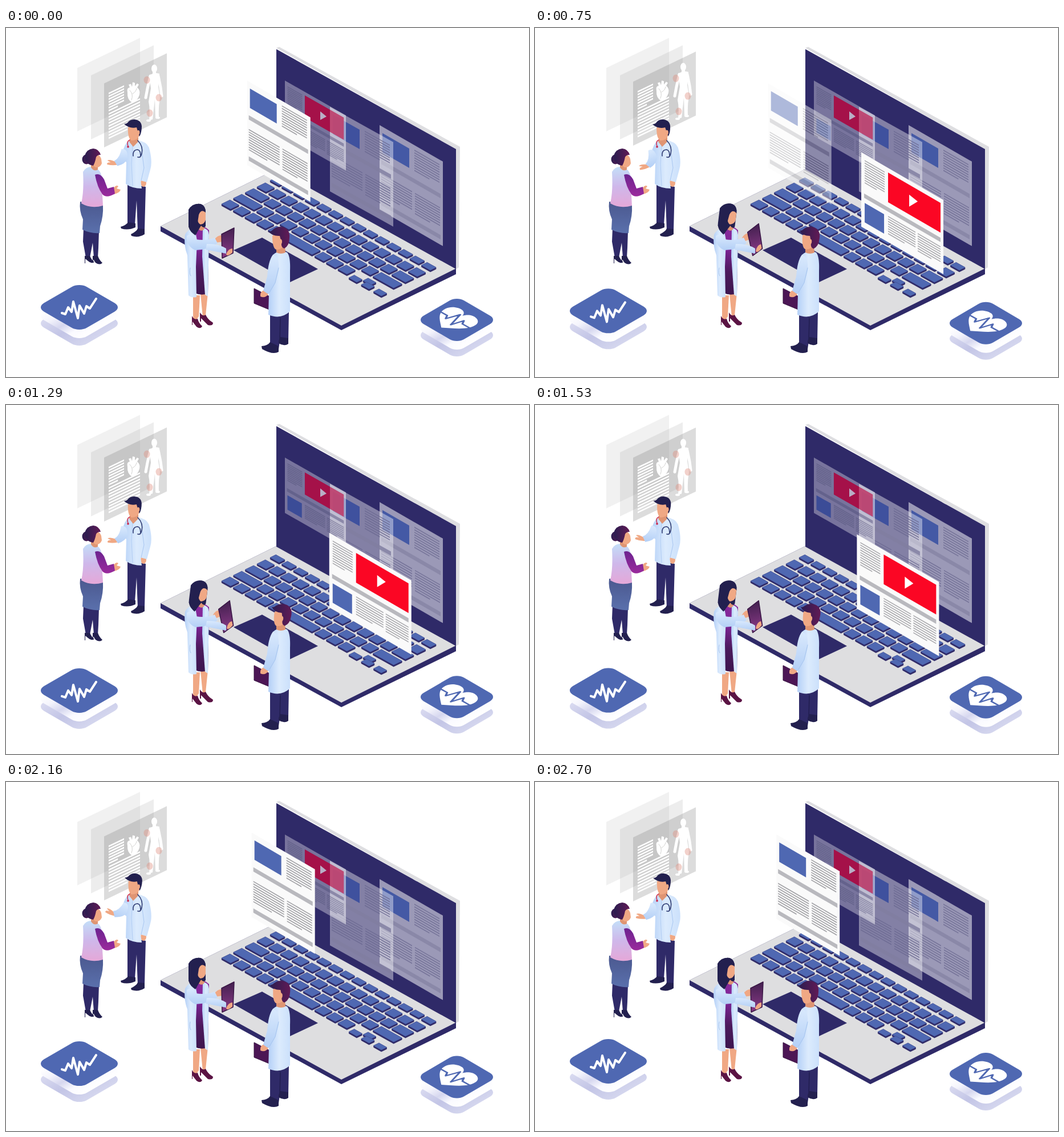
An HTML page for the animation above (2730 ms loop, 917 px wide and 611 px high).

```html
<!DOCTYPE html>
<html lang="en">
<head>
<meta charset="utf-8">
<title>Online medicine</title>
<style>
html, body { margin: 0; width: 100%; height: 100%; overflow: hidden; background: #fff; }
svg { display: block; width: 917px; height: 611px; }
</style>
</head>
<body>
<svg id="stage" viewBox="0 0 917 611" xmlns="http://www.w3.org/2000/svg"></svg>
<script>
const LOOP = 2730, STEP = 30;
const NAVY = '#2f2a68', BLUE = '#4f68b2', SKIN = '#f0a884', DARK = '#23204f';

const poly = (pts, fill, extra = '') => `<polygon points="${pts}" fill="${fill}" ${extra}/>`;
const path = (d, fill, extra = '') => `<path d="${d}" fill="${fill}" ${extra}/>`;
const line = (d, color, w) =>
  path(d, 'none', `stroke="${color}" stroke-width="${w}" stroke-linecap="round" stroke-linejoin="round"`);
const rect = (x, y, w, h, fill, extra = '') =>
  `<rect x="${x}" y="${y}" width="${w}" height="${h}" fill="${fill}" ${extra}/>`;
const oval = (x, y, rx, ry, fill, extra = '') =>
  `<ellipse cx="${x}" cy="${y}" rx="${rx}" ry="${ry}" fill="${fill}" ${extra}/>`;
const group = (body, attrs = '') => `<g ${attrs}>${body}</g>`;
const skew = (x, y, k) => `transform="matrix(1 ${k} 0 1 ${x} ${y})"`;
const grad = (id, dir, ...colors) => `<linearGradient id="${id}" ${dir}>` + colors.map((c, i) =>
  `<stop offset="${i / (colors.length - 1)}" stop-color="${c}"/>`).join('') + '</linearGradient>';
const DOWN = 'x2="0" y2="1"', ACROSS = 'x2="1" y2="0"';

const defs = '<defs>' +
  grad('coat', ACROSS, '#b4d0f7', '#dcebfd', '#cbe0fb') +
  grad('sleeve', DOWN, '#d9e9fd', '#b3cff6') +
  grad('knit', DOWN, '#c3def8', '#cfb7ea', '#e5a8d8') +
  grad('violet', DOWN, '#6d2390', '#9a2a9c') +
  grad('dress', DOWN, '#8a2a9e', '#7c2394', '#4b1a5c', '#3d164f') +
  grad('skirt', DOWN, '#4b588f', '#5a70ac') +
  grad('hair', ACROSS, '#2a1d50', '#611a55') +
  grad('tablet', DOWN, '#43204f', '#8b3a88') +
  grad('side', ACROSS, '#ffffff', '#f4f4fc', '#d6d7ef', '#fafaff', '#ffffff') +
  grad('shade', ACROSS, '#d9daf0', '#c3c5e6', '#d4d6ee') +
  '</defs>';

// Rows of text; the last row is shorter.
function rows(x, y, w, n, step, h, fill) {
  let s = '';
  for (let i = 0; i < n; i++) s += rect(x, y + i * step, i == n - 1 ? w * .6 : w, h, fill);
  return s;
}

function article(paper, ink, bar, blue) {
  return rect(0, 0, 111, 148, paper) + rect(5, 11, 47, 34, blue) +
    rows(61, 8, 44, 9, 4.4, 1.9, ink) + rect(3, 59, 104, 7.5, bar) +
    rows(3, 83, 54, 9, 4.4, 1.9, ink) + rows(62, 83, 44, 9, 4.4, 1.9, ink) +
    rect(3, 131, 104, 7.5, bar);
}

function video(w, h, paper, ink, bar, blue, red) {
  const a = w / 144, b = h / 130;
  return rect(0, 0, w, h, paper) + rows(6 * a, 10 * b, 35 * a, 10, 4.3 * b, 1.8, ink) +
    rect(47 * a, 8 * b, 92 * a, 52 * b, red) + rect(5 * a, 69 * b, 134 * a, 7.5 * b, bar) +
    rect(6 * a, 85 * b, 34 * a, 34 * b, blue) +
    rows(47 * a, 84 * b, 48 * a, 8, 4.3 * b, 1.8, ink) + rows(99 * a, 84 * b, 40 * a, 8, 4.3 * b, 1.8, ink);
}

function key(u, v, w = 1, du = .76, dv = .7) {
  const at = (p, q) => [476 + p * 20.4 - q * 20.7, 269 + p * 11.4 + q * 10];
  const a = (w - 1 + du) / 2, b = dv / 2;
  const corners = [[-a, -b], [a, -b], [a, b], [-a, b]].map(([p, q]) => at(u + p, v + q));
  const [top, right, low, left] = corners;
  const drop = ([x, y]) => [x, y + 3];
  const pts = list => list.map(c => c.map(n => n.toFixed(1)).join()).join(' ');
  return poly(pts([left, top, right, drop(right), drop(low), drop(left)]), NAVY,
      `stroke="${NAVY}" stroke-width=".8" stroke-linejoin="round"`) +
    poly(pts(corners), BLUE, `stroke="${BLUE}" stroke-width=".6" stroke-linejoin="round"`);
}

function keyboard() {
  const layout = [
    Array(14).fill(1),
    Array(14).fill(1),
    [1.6, ...Array(11).fill(1), 1.4],
    [2, ...Array(10).fill(1), 2],
    [1, 1, 1, 1, 4, 1, 1, 1]
  ];
  let s = '';
  layout.forEach((row, v) => {
    let u = -.5;
    for (const w of row) {
      s += key(u + w / 2, v, w, .76, v ? .7 : .48);
      u += w;
    }
  });
  s += key(11.9, 3.93, 1, .66, .42);
  for (let i = 0; i < 3; i++) s += key(11.1 + i * 1.06, 4.33, 1, .66, .45);
  return s;
}

function laptop() {
  const ink = '#77759a', bar = '#8a88a8';
  return poly('271,347 474,247 789,421 789,431 588,529 271,356', NAVY) +
    poly('271,347 474,247 789,421 588,521', '#dedee0') +
    poly('474,35 479,33 796,208 794,419 789,422 789,212', '#dedee1') +
    poly('474,37 789,212 789,422 474,248', NAVY) +
    keyboard() + poly('399,389 449,367 547,422 498,445', NAVY) +
    group(article('rgba(255,255,255,.52)', ink, bar, '#4459a5'), skew(655, 170, .575)) +
    group(article('rgba(255,255,255,.45)', ink, bar, '#4156a4'), 'opacity=".9" ' + skew(568, 138, .556)) +
    group(video(107, 97, 'rgba(255,255,255,.38)', '#6a688f', '#696790', '#3d4f9c', '#b00f47'),
      'opacity=".92" ' + skew(489, 92, .57)) +
    poly('568,138 596,153 596,248 568,232', 'rgba(255,255,255,.22)') +
    poly('551,146 551,161 562,155', '#b9aec6');
}

function poster() {
  const sheet = (x, y, h, a) => group(rect(0, 0, 110, h, `rgba(125,125,126,${a})`), skew(x, y, -.48));
  const body = line('M260 82V108M253 84L248 106L245 122M267 84L271 104L273 119', '#fff', 5) +
    path('M251 83Q260 77 269 80L267 103L270 122Q267 139 268 155L262 157L261 125L257 160L251 162Q253 142 250 129L254 106Z', '#fff') +
    oval(260, 71, 5, 7, '#fff') + rect(257, 75, 6, 7, '#fff') +
    oval(250, 162, 4, 2, '#fff') + oval(266, 157, 4, 2, '#fff');
  const heart = path('M213 113Q211 105 217 104L215 99L219 98L221 103L222 95L226 96L226 102L230 97L233 99L230 104Q236 109 234 117Q231 127 222 131Q212 126 213 113Z', '#fff') +
    line('M217 109Q224 116 220 126M222 115Q228 112 229 106', '#d2d2d0', 1);
  const spot = (x, y) => oval(x, y, 5.5, 6.5, 'rgba(222,140,125,.4)');
  return sheet(125, 70, 111, .11) + sheet(149, 83, 112, .14) +
    group(sheet(172, 97, 112, .27) +
      group(rows(8, 20, 27, 7, 5, 2.8, '#fff') + rows(8, 56, 55, 9, 5.3, 2.8, '#fff'), skew(172, 97, -.48)) +
      heart + body + spot(247, 91) + spot(268, 122) + spot(252, 149), 'id="sheet"');
}

function leftDoctor() {
  return path('M213 272L245 278L243 353L231 356L229 302L226 344L213 343Z', NAVY) +
    path('M201 348Q211 345 214 340L227 342V349Q214 355 202 351Z', DARK) +
    path('M219 361Q229 356 231 351L243 352V361Q232 368 220 364Z', DARK) +
    oval(241, 271, 5, 7, SKIN) +
    path('M212 200Q220 194 237 198Q250 202 252 214Q257 235 253 248L247 270L236 267L238 281Q221 281 210 273L211 235L203 228Q204 211 212 200Z', 'url(#coat)') +
    line('M239 222L242 245L237 267', '#a9c7f1', 1) + line('M222 204L220 238L222 276', '#b2cdf3', 1) +
    group(path('M208 231L196 240Q187 242 178 240Q176 236 184 236L178 233Q182 230 193 235L204 223Z', SKIN) +
      path('M202 212Q214 210 213 228Q210 238 196 242L190 233Q199 229 202 212Z', 'url(#sleeve)'), 'id="arm"') +
    path('M218 189H232V199L223 208L216 199Z', '#df9573') +
    line('M217 196Q211 198 214 207', '#d0304e', 1.5) + oval(214, 208, 1.8, 1.8, '#c92145') +
    line('M231 197Q241 207 238 220Q236 228 231 226M223 224Q222 213 231 213Q236 214 236 224', '#344177', 1.7) +
    group(path('M214 174Q223 167 235 173L234 188Q230 197 220 197Q213 193 214 174Z', SKIN) +
      path('M207 168Q211 168 213 166Q217 160 225 160Q237 161 238 172Q238 183 234 190L231 181L229 174Q217 177 207 168Z', DARK) +
      oval(232, 183, 2.4, 4, SKIN), 'id="head1"');
}

function leftWoman() {
  return path('M136 350L163 355L162 385L161 402L154 402L152 376L147 402L140 402L135 374Z', NAVY) +
    path('M138 399L147 399Q150 406 155 410Q149 413 144 408L139 404L139 412H138Z', DARK) +
    path('M152 399L161 399Q164 407 169 411Q165 416 157 411L153 405L153 410H152Z', DARK) +
    path('M130 304L170 310Q171 330 165 347L164 359Q148 360 134 353L135 335Q128 320 130 304Z', 'url(#skirt)') +
    path('M135 252Q140 242 152 243L163 249Q171 260 168 275L170 311Q149 317 132 307Q137 286 135 252Z', 'url(#knit)') +
    path('M188 281Q193 274 197 277L194 281L201 283Q199 289 189 291Z', SKIN) +
    path('M156 257Q165 253 172 265L178 281L189 278L191 290Q176 299 169 291Q160 279 156 257Z', 'url(#violet)') +
    path('M149 235H161V248Q154 252 149 244Z', '#df9573') +
    path('M151 226Q163 217 167 229L168 237Q165 245 157 244Q151 242 151 226Z', SKIN) +
    oval(141, 230, 7.5, 8.5, 'url(#hair)') +
    path('M138 224Q141 212 153 211Q163 212 166 222Q160 222 158 226Q156 236 153 241Q139 239 138 224Z', 'url(#hair)');
}

function midWoman() {
  return path('M328 468H340L338 505L333 512L328 510Z', SKIN) + path('M341 465L354 464L350 503L345 506Z', SKIN) +
    path('M326 504Q330 512 336 509Q338 517 344 522Q341 528 334 523L327 514V520H326Z', '#5b1444') +
    path('M340 498Q345 506 350 502Q354 511 363 516Q363 522 354 520L342 508V514H340Z', '#5b1444') +
    path('M331 352Q344 342 356 354L354 465Q342 469 331 464Z', 'url(#dress)') +
    path('M314 362Q318 352 331 350L335 372L333 418L334 471Q325 473 320 468L318 398Q311 380 314 362Z', 'url(#coat)') +
    path('M345 350Q355 351 356 362L354 470L349 467L344 400Z', 'url(#coat)') +
    line('M323 420Q321 430 324 434', '#a5c4ef', 1) +
    group(path('M365 371Q371 362 379 363L380 374L367 376Z', SKIN) +
      poly('378,361 400,350 398,394 379,403', 'url(#tablet)', 'stroke="#3a1746" stroke-width="1.5" stroke-linejoin="round"') +
      path('M386 396Q390 386 397 386L397 393Q391 399 387 398Z', SKIN), 'id="tab"') +
    path('M317 364Q324 358 333 370Q351 373 366 367L371 377Q352 389 332 389Q316 382 317 364Z', 'url(#sleeve)') +
    path('M352 378Q372 377 386 386L386 395Q366 391 350 388Z', 'url(#sleeve)') +
    path('M336 338H348V351Q343 359 335 350Z', '#df9573') +
    group(path('M322 317Q330 306 341 308Q351 311 350 326L350 347Q347 352 342 346L332 363Q324 358 320 348Q325 330 322 317Z', DARK) +
      path('M335 323Q343 315 350 321V336Q348 343 341 344Q334 341 335 323Z', SKIN) +
      path('M320 318Q327 306 341 308Q350 311 350 323Q342 316 338 327Q335 344 334 361Q322 360 320 345Z', DARK), 'id="head2"');
}

function rightDoctor() {
  return path('M463 500L496 495L495 547L480 549L478 562L463 561Z', NAVY) +
    line('M481 508L480 548', '#211e50', 1.5) +
    path('M448 557Q459 556 463 550L478 557V567Q468 573 449 562Z', DARK) +
    path('M478 548L481 541L495 543V553Q488 558 478 552Z', DARK) +
    poly('435,456 464,471 464,494 435,482', '#4c1655', 'stroke="#35123f" stroke-linejoin="round"') +
    path('M468 397Q480 387 493 393Q499 400 498 425L498 496Q482 511 460 502L461 465Q459 425 468 397Z', 'url(#coat)') +
    path('M446 466Q448 458 458 458L460 466Q454 474 446 470Z', SKIN) +
    path('M468 397Q480 400 478 425L472 446L460 466L451 460L458 435Q460 407 468 397Z', 'url(#sleeve)') +
    line('M478 420L472 446L462 463', '#a5c4ef', 1) +
    path('M474 381H489L490 393Q482 397 474 393Z', '#df9573') +
    group(path('M467 364Q474 357 487 363L488 379Q484 388 474 388Q467 386 467 364Z', SKIN) +
      path('M461 356Q465 357 468 353Q476 346 487 349Q498 353 497 367Q497 381 488 386Q482 384 483 376L480 364Q467 365 461 356Z', 'url(#hair)') +
      oval(481, 374, 3, 4.5, SKIN), 'id="head3"');
}

function tile(id, x, y, w, h, drop, icon) {
  const a = w / 1.795, b = h / 1.795;
  const face = (dy, fill) =>
    rect(-1, -1, 2, 2, fill, `rx=".35" transform="matrix(${a} ${b} ${-a} ${b} ${x} ${y + dy})"`);
  const slab = rect(x - w, y, w * 2, 15, 'url(#side)') + face(15, 'url(#side)');
  return group(face(drop, 'url(#shade)') +
    group(slab, '') + face(0, BLUE) + icon, `id="${id}"`);
}

const pulse = line('M98 499L104 501L109 489L115 497L118 479L126 508L129 486L137 500L141 487L147 491L158 474', '#fff', 4);
// Upright heart laid flat: its right points down-right, its top up-right.
const heart = group(
  path('M0 .95C-.5 .55 -1.05 .2 -1.02 -.35C-1 -.75 -.6 -.9 -.35 -.85C-.15 -.8 -.05 -.65 0 -.5C.05 -.65 .15 -.8 .35 -.85C.6 -.9 1 -.75 1.02 -.35C1.05 .2 .5 .55 0 .95Z', '#fff') +
  line('M-1.05 0H-.55L-.4 .25L-.15 -.5L.15 .45L.35 -.25L.5 0H1.05', BLUE, .1),
  'transform="matrix(25.5 14.2 -25.5 14.2 787.5 511)"');

const $ = id => document.getElementById(id);
$('stage').innerHTML = defs + poster() + laptop() +
  group(group(article('#fafafa', '#a2a2a6', '#b9b9be', BLUE), skew(0, 0, .58)), 'id="page"') +
  group(group(video(144, 130, '#fafafa', '#a9a9ad', '#b9b9be', BLUE, '#fb0624'), skew(0, 0, .578)) +
    poly('84,74 84,95 99,86', '#fff'), 'id="clip"') +
  leftDoctor() + leftWoman() + midWoman() + rightDoctor() +
  tile('tileL', 128.5, 489, 67.5, 39, 28, pulse) +
  tile('tileR', 790.5, 511, 63.5, 37, 27, heart);

const move = (id, value) => $(id).setAttribute('transform', value);
const ease = (t, a, b) => {
  const p = Math.min(1, Math.max(0, (t - a) / (b - a)));
  return p * p * (3 - 2 * p);
};

function draw(t) {
  const w = t / LOOP * Math.PI * 2, sin = Math.sin(w), half = (1 - Math.cos(w)) / 2;
  move('tileL', `translate(0 ${11 * half})`);
  move('tileR', `translate(0 ${3 - 3 * Math.cos(2 * w)})`);
  move('sheet', `translate(0 ${-5 * half})`);
  move('arm', `rotate(${2 - 20 * sin} 208 224)`);
  move('head1', `rotate(${-2 * sin} 226 198)`);
  move('head3', `rotate(${8 * half} 482 390)`);

  const turn = ease(t, 0, 500) * (1 - ease(t, 1740, 2150));
  move('head2', `rotate(${7 * turn} 342 350)`);
  move('tab', `translate(${turn} ${-6 * turn}) rotate(${-11 * turn} 388 395)`);

  const s = t > LOOP / 2 ? t - LOOP : t;
  move('page', `translate(${422.7 - .016 * s - 3.5e-6 * s * s} ${92 + .0062 * s})`);
  $('page').setAttribute('opacity', ease(s, -1150, -830) * (1 - ease(s, 580, 900)));
  move('clip', `translate(${579.4 - .0098 * t} ${209.5 + .0111 * t})`);
  $('clip').setAttribute('opacity', ease(t, 200, 520) * (1 - ease(t, 1580, 1900)));
}

function tick() {
  draw(Math.floor(performance.now() % LOOP / STEP) * STEP);
  requestAnimationFrame(tick);
}
tick();
</script>
</body>
</html>
```
